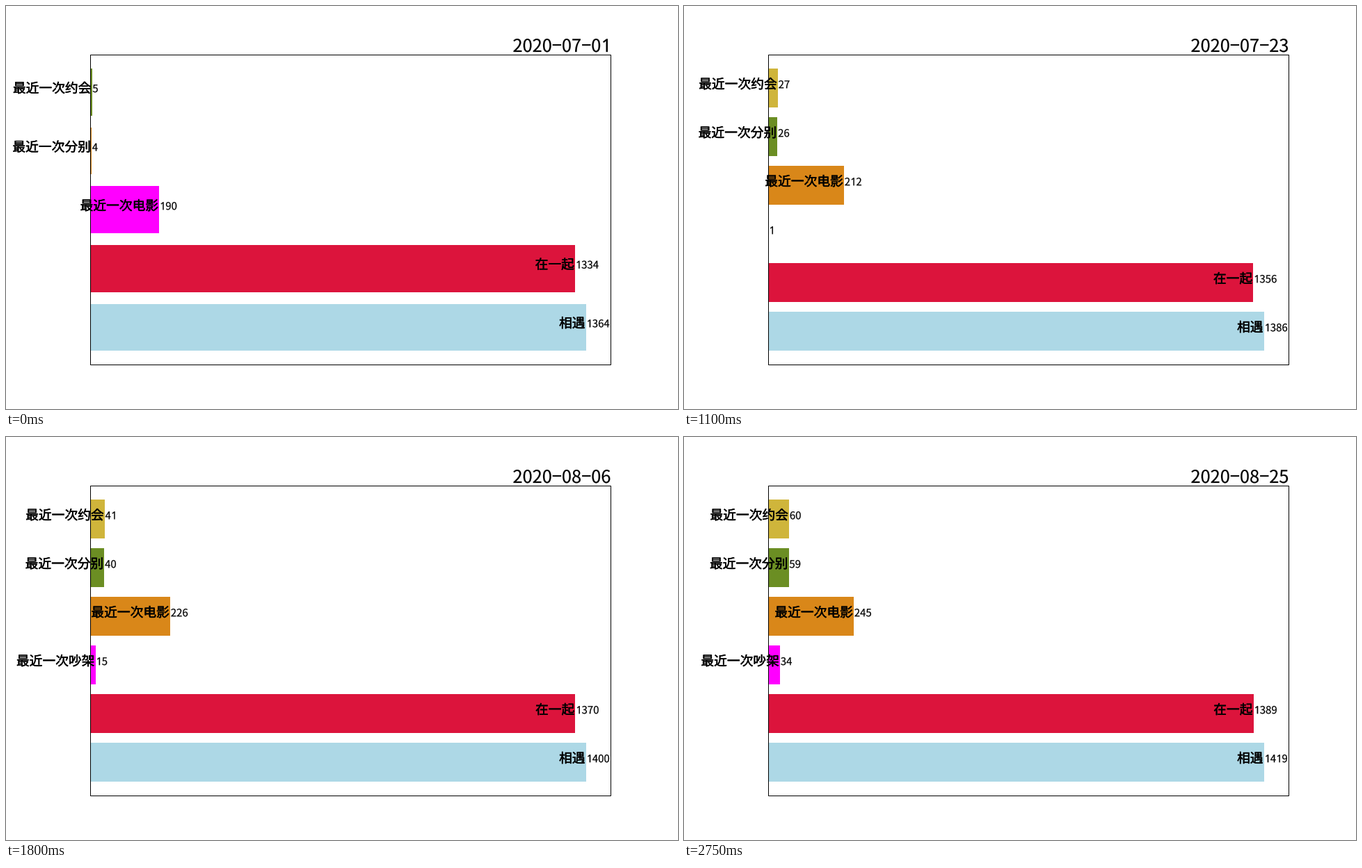
Write a matplotlib script that moves like this. It is 966x580 px and loops after 2800 ms.

```python
import numpy as np
import matplotlib.pyplot as plt
from matplotlib.animation import FuncAnimation
from matplotlib.patches import PathPatch, Rectangle
from matplotlib.path import Path
from matplotlib.patheffects import withStroke
from matplotlib.textpath import TextPath

W, H, DPI = 966, 580, 100
FRAMES, INTERVAL = 56, 50
LEFT, RIGHT = 121, 869.4
BOTTOM, TOP = H - 516.45, H - 70
FONT = "Noto Sans CJK JP"
ADVANCE = 0.555  # digit width in em

COLORS = ["lightblue", "crimson", "magenta", "#D98719", "#6B8E23", "#CFB53B"]
MEET, TOGETHER = "相遇", "在一起"
QUARREL, FILM = "最近一次吵架", "最近一次电影"
PARTING, DATE = "最近一次分别", "最近一次约会"
QUARREL_START = 22

fig = plt.figure(figsize=(W / DPI, H / DPI), dpi=DPI, facecolor="white")
ax = fig.add_axes([0, 0, 1, 1])
bolder = [withStroke(linewidth=0.35, foreground="black")]


def polygon(points):
    codes = [Path.MOVETO] + [Path.LINETO] * (len(points) - 1) + [Path.CLOSEPOLY]
    return Path(points + points[:1], codes)


def make_glyphs():
    """Digits one em high, with a footless 1 and a wide dash."""
    glyphs = {}
    for ch in "023456789":
        outline = TextPath((0, 0), ch, size=100, prop={"family": FONT})
        glyphs[ch] = Path(outline.vertices / 100, outline.codes)
    glyphs["1"] = polygon([(0.29, 0), (0.38, 0), (0.38, 0.733), (0.31, 0.733),
                           (0.11, 0.58), (0.16, 0.52), (0.29, 0.625)])
    glyphs["-"] = polygon([(0.04, 0.355), (0.52, 0.355), (0.52, 0.43), (0.04, 0.43)])
    return glyphs


GLYPHS = make_glyphs()


def draw_digits(text, x, y, size, right=False):
    if right:
        x -= len(text) * ADVANCE * size
    verts, codes = [], []
    for i, ch in enumerate(text):
        glyph = GLYPHS[ch]
        verts.append(glyph.vertices * size + (x + i * ADVANCE * size, y))
        codes.append(glyph.codes)
    path = Path(np.concatenate(verts), np.concatenate(codes))
    ax.add_patch(PathPatch(path, facecolor="black", edgecolor="black",
                           linewidth=0.15, zorder=4))


def day_counts(frame):
    rows = [(MEET, 1364 + frame), (TOGETHER, 1334 + frame)]
    if frame >= QUARREL_START:
        days = frame - QUARREL_START + 1
        rows.append((QUARREL if days > 1 else "", days))
    return rows + [(FILM, 190 + frame), (PARTING, 4 + frame), (DATE, 5 + frame)]


def draw(frame):
    ax.clear()
    ax.axis("off")
    ax.set(xlim=(0, W), ylim=(0, H))

    rows = day_counts(frame)
    span = len(rows) - 0.2
    unit = (TOP - BOTTOM) / (1.1 * span)
    scale = (RIGHT - LEFT) / (1.05 * rows[0][1])

    for i, (name, days) in enumerate(rows):
        y = BOTTOM + (0.05 * span + 0.4 + i) * unit
        end = LEFT + days * scale
        ax.add_patch(Rectangle((LEFT, y - 0.4 * unit), end - LEFT, 0.8 * unit,
                               facecolor=COLORS[i], linewidth=0, zorder=1))
        ax.text(end - 1.2, y - 0.5, name, ha="right", va="baseline", fontsize=13.5,
                family=FONT, color="black", path_effects=bolder, zorder=3)
        draw_digits(str(days), end + 0.7, y, 15)

    ax.add_patch(Rectangle((LEFT, BOTTOM), RIGHT - LEFT, TOP - BOTTOM, fill=False,
                           edgecolor="black", linewidth=0.72, zorder=2))
    month, day = divmod(frame, 31)
    draw_digits(f"2020-{7 + month:02d}-{day + 1:02d}", RIGHT, H - 66, 25.4, right=True)
    return []


anim = FuncAnimation(fig, draw, frames=FRAMES, interval=INTERVAL,
                     init_func=lambda: draw(0), repeat=True, repeat_delay=0)
plt.show()
```
